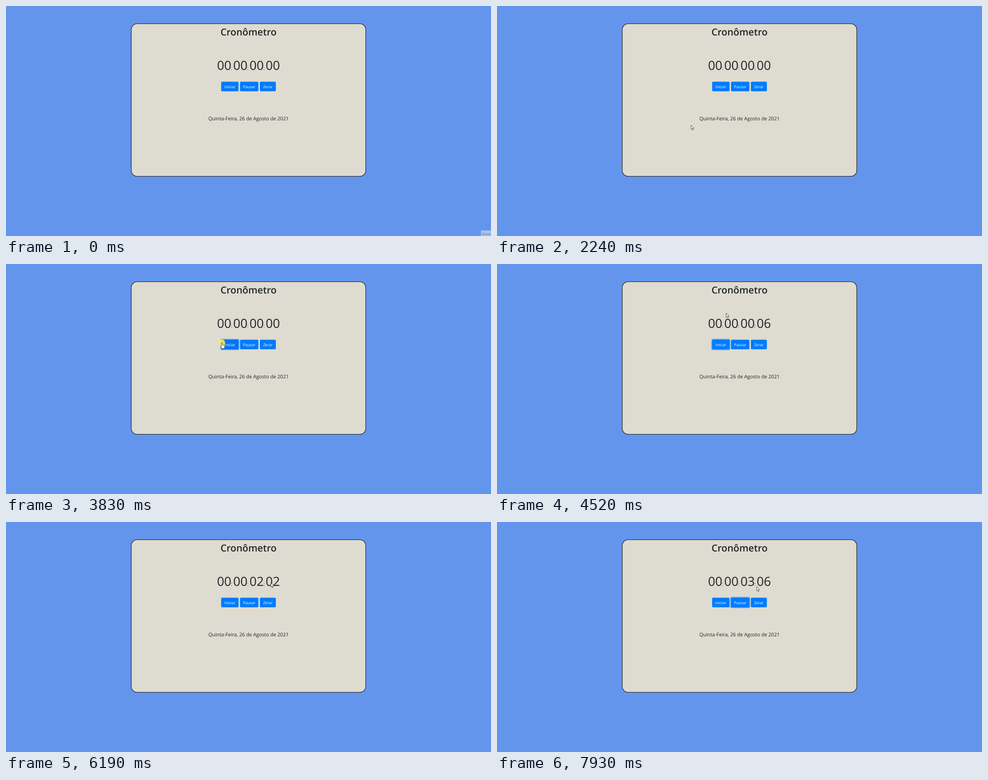
An HTML page for the animation above (7.99 s loop, 1087x515 px).

```html
<!DOCTYPE html>
<html lang="pt-BR">
<head>
<meta charset="utf-8">
<title>Cronômetro</title>
<style>
html, body { margin: 0; width: 100%; height: 100%; overflow: hidden; background: #6495ed; }
svg { display: block; width: 1087px; height: 515px; }
text { font-family: "Open Sans", "Noto Sans", sans-serif; fill: #212529; text-anchor: middle; text-rendering: geometricPrecision; }
.title { font-size: 21.5px; font-weight: 600; }
.date { font-size: 11.05px; }
.digits { font-size: 28px; }
.colon { font-size: 11px; }
.label { font-size: 8.6px; fill: #fff; }
.tip { font-size: 7px; fill: #64759b; text-anchor: start; }
.sel text { fill: #fff; }
.sel rect { fill: #2f8cf8; }
.pointer { fill: #fff; stroke: #222; stroke-width: .8; stroke-linejoin: round; }
</style>
</head>
<body>
<svg viewBox="0 0 1087 515">
  <rect width="1087" height="515" fill="#6495ed"/>
  <rect x="280.7" y="39.6" width="525.6" height="341.8" rx="13.5" fill="#dedcd0" stroke="#212529" stroke-width="1.3"/>
  <g id="page"></g>
  <g id="tooltip">
    <rect x="1064.5" y="502.5" width="23" height="13" fill="#a7c0ef"/>
    <text class="tip" x="1067" y="513">Gravar</text>
  </g>
  <circle id="click" r="7.6" fill="#f3ea5c" opacity=".92"/>
  <path id="arrow" class="pointer" d="M0 0V9.2L2.1 7.3 3.6 10.7 5.1 10 3.6 6.7H6.4Z"/>
  <path id="hand" class="pointer" d="M-.9 .6Q.2-.9 1.3 .6V4.5Q2.2 4 3 5Q4 4.5 4.7 5.5Q6.5 5 6.7 7V9.5L5.5 12.8H.5L-2.7 8.5Q-3 6.7-.9 7.6Z"/>
</svg>
<script>
const LOOP = 7990, STEP = 70, CENTER = 543.5;
const $ = id => document.getElementById(id);
const page = $('page');

function add(tag, attrs, parent = page, content = '') {
  const el = document.createElementNS('http://www.w3.org/2000/svg', tag);
  for (const key in attrs) el.setAttribute(key, attrs[key]);
  el.textContent = content;
  parent.append(el);
  return el;
}
const show = (el, on) => el.setAttribute('visibility', on ? 'visible' : 'hidden');
const moveTo = (el, x, y) => el.setAttribute('transform', `translate(${x} ${y})`);
const during = (t, from, to) => t >= from && t < to;
const clamp = (v, low, high) => Math.max(low, Math.min(high, v));

// Text with a highlighted copy that is revealed by a clip
function selectable(content, cls, baseline, top, width, height) {
  const text = { class: cls, x: CENTER, y: baseline };
  const box = { x: CENTER - width / 2, y: top, width, height };
  add('text', text, page, content);
  const clip = add('clipPath', { id: cls + 'Clip' });
  const mask = add('rect', box, clip);
  const group = add('g', { class: 'sel', 'clip-path': `url(#${cls}Clip)` });
  add('rect', box, group);
  add('text', text, group, content);
  return end => mask.setAttribute('width', clamp(end - box.x, 0, width));
}
const selectTitle = selectable('Cronômetro', 'title', 66, 41, 126, 30.5);
const selectDate = selectable('Quinta-Feira, 26 de Agosto de 2021', 'date', 255.7, 242, 180.4, 15.5);

// Four pairs of digits with a colon in each gap
const PITCH = 36.4, BASE = 142.6;
const fields = [];
for (let i = 0; i < 4; i++) {
  const x = CENTER + (i - 1.5) * PITCH;
  fields.push(add('text', { class: 'digits', x, y: BASE }));
  if (i < 3) add('text', { class: 'colon', x: x + 16.7, y: BASE }, page, ':');
}

const TOP = 169.5, HEIGHT = 21.6, GAP = 3.3, RING = 1.9;
let left = 482.2;
function button(name, width) {
  const x = left;
  left += width + GAP;
  const ring = add('rect', {
    x: x - RING, y: TOP - RING, width: width + 2 * RING, height: HEIGHT + 2 * RING,
    rx: 3.8, fill: '#007bff', opacity: .5
  });
  const face = add('rect', { x, y: TOP, width, height: HEIGHT, rx: 2.3 });
  add('text', { class: 'label', x: x + width / 2, y: 183.7 }, page, name);
  const contains = (px, py) => during(px, x, x + width) && during(py, TOP, TOP + HEIGHT);
  return { ring, face, contains };
}
const start = button('Iniciar', 39), pause = button('Pausar', 41.2), reset = button('Zerar', 35.8);
const buttons = [start, pause, reset];

// Key stops of the pointer: time, x, y
const stops = [
  [70, 1080, 506], [840, 572, 269], [1260, 408, 207], [1720, 512, 184],
  [1900, 512, 184], [2240, 435, 267], [3080, 674.7, 247], [3600, 506, 190],
  [4060, 440, 150], [4480, 513.5, 110], [5150, 464, 57], [5600, 623, 57],
  [6040, 613, 125], [6480, 507, 188], [6930, 578, 185], [7650, 547, 185], [7910, 582, 145]
];
const dateDrag = { from: 2310, to: 2900, clear: 2940 };
const titleDrag = { from: 5150, to: 5700, clear: 5770 };
const drags = [dateDrag, titleDrag];
const START = 3710, PAUSE = 7600, CLICK = 110;
const clicks = [START, PAUSE, dateDrag.clear, titleDrag.clear];

const ease = k => k * k * (3 - 2 * k);
function pointerAt(t) {
  const i = stops.findIndex(s => s[0] > t);
  if (i < 1) return stops.at(i).slice(1);
  const [t0, x0, y0] = stops[i - 1], [t1, x1, y1] = stops[i];
  const k = ease((t - t0) / (t1 - t0));
  return [x0 + (x1 - x0) * k, y0 + (y1 - y0) * k];
}

function render(t) {
  const held = Math.floor(t / STEP) * STEP;
  const [x, y] = pointerAt(held);
  const visible = t >= STEP;
  const hovered = buttons.find(b => b.contains(x, y));
  const pressed = drags.some(d => during(held, d.from, d.to)) ||
    clicks.some(c => during(held, c, c + CLICK));

  show($('tooltip'), !visible);
  show($('arrow'), visible && !hovered);
  show($('hand'), visible && hovered);
  show($('click'), pressed);
  for (const id of ['arrow', 'hand', 'click']) moveTo($(id), x, y);

  const focused = during(t, START, titleDrag.from) ? start : t >= PAUSE ? pause : null;
  for (const b of buttons) {
    show(b.ring, b === focused);
    b.face.setAttribute('fill', b === hovered ? '#0074f2' : '#007bff');
  }

  selectDate(during(held, dateDrag.from, dateDrag.clear) ? x : 0);
  selectTitle(during(held, titleDrag.from, titleDrag.clear) ? x : 0);

  // Tenths of a second, stopped by the pause click
  const ticks = Math.max(0, Math.floor((Math.min(t, PAUSE + 60) - START - 80) / 107));
  [0, 0, Math.floor(ticks / 10), ticks % 10].forEach((n, i) => {
    fields[i].textContent = String(n).padStart(2, '0');
  });
}

const origin = performance.now();
function tick() {
  render((performance.now() - origin) % LOOP);
  requestAnimationFrame(tick);
}
tick();
</script>
</body>
</html>
```
